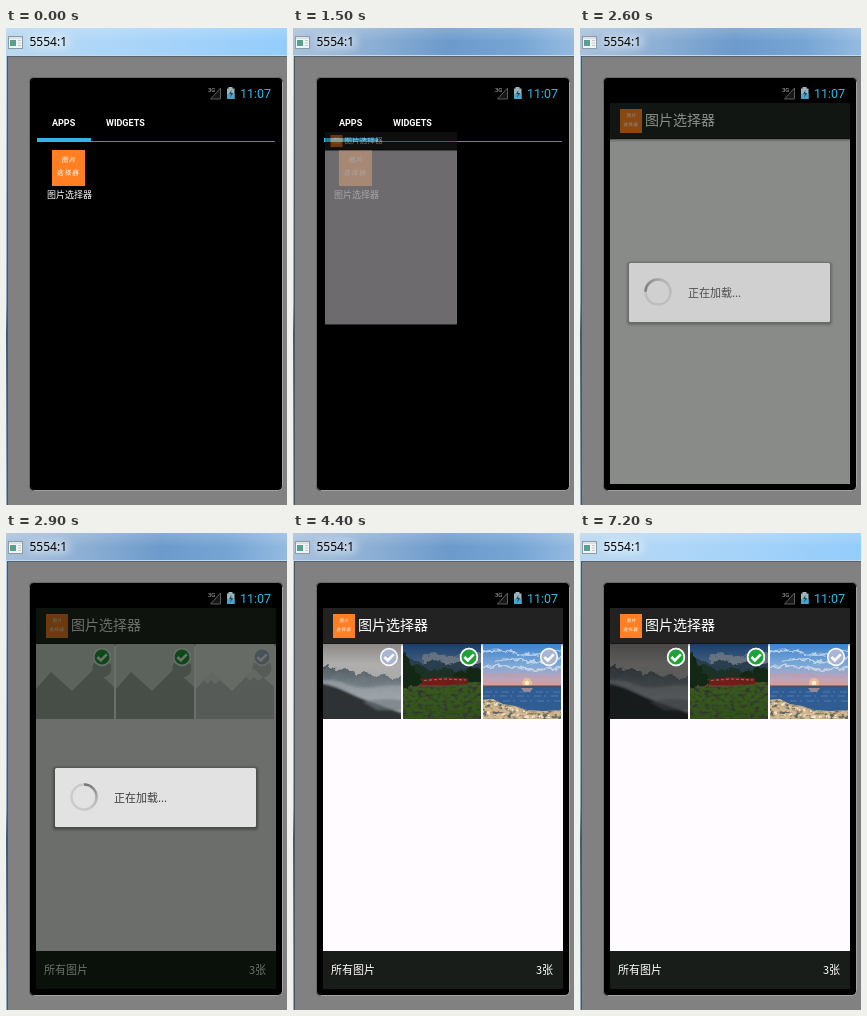
An HTML page that plays this animation: 281 by 477 pixels, repeating every 7.3 s.

```html
<!DOCTYPE html>
<html lang="zh-CN">
<head>
<meta charset="utf-8">
<title>图片选择器</title>
<style>
html, body { margin: 0; width: 100%; height: 100%; overflow: hidden; background: #818181; }
svg { display: block; width: 281px; height: 477px; }
text { font-family: "Noto Sans CJK SC", "Noto Sans CJK", "Noto Sans", sans-serif; font-weight: 500; fill: #fff; }
.latin { font-family: Roboto, sans-serif; font-weight: 400; }
.tab { font-weight: 700; }

/* One 7.3 s loop, hard steps on a 100 ms grid */
.focus, .launcher, .app, .grid, .photos, .dim, .dialog, .on1, .on2 {
  animation: 7.3s step-end infinite;
}
.focus { animation-name: focus; }
.launcher { animation-name: recede; }
.app { animation-name: open; }
.grid { animation-name: grid; }
.photos { animation-name: photos; }
.dim, .dialog { animation-name: loading; }
.on1 { animation-name: toggle1; }
.on2 { animation-name: toggle2; }
.spin { animation: spin 7.3s steps(73) infinite; }

@keyframes focus {
  0% { opacity: 0; } 12.32% { opacity: .6; } 13.69% { opacity: 1; } 98.63%, 100% { opacity: 0; }
}
@keyframes recede { 0% { opacity: 1; } 20.54% { opacity: .4; } 21.91%, 100% { opacity: 0; } }
@keyframes open {
  0% { opacity: 0; transform: translate(32px, 104px) scale(.55, .504); }
  20.54% { opacity: .43; transform: translate(32px, 104px) scale(.55, .504); }
  21.91% { opacity: .8; transform: translate(30.6px, 84px) scale(.85, .83); }
  23.28%, 100% { opacity: 1; transform: translate(30px, 75px); }
}
@keyframes grid { 0% { opacity: 0; } 39.72%, 100% { opacity: 1; } }
@keyframes photos { 0% { opacity: 0; } 42.46%, 100% { opacity: 1; } }
@keyframes loading {
  0% { opacity: 0; } 34.24% { opacity: .4; } 35.61% { opacity: .8; } 36.98% { opacity: 1; }
  41.09% { opacity: .6; } 42.46% { opacity: .25; } 43.83%, 100% { opacity: 0; }
}
@keyframes toggle1 { 0% { opacity: 1; } 60.27% { opacity: 0; } 79.45%, 100% { opacity: 1; } }
@keyframes toggle2 { 0% { opacity: 1; } 71.23% { opacity: 0; } 91.78%, 100% { opacity: 1; } }
@keyframes spin { from { transform: rotate(-138deg); } to { transform: rotate(2022deg); } }
</style>
</head>
<body>
<svg viewBox="0 0 281 477" xmlns="http://www.w3.org/2000/svg">
<defs>
  <linearGradient id="barLight">
    <stop offset="0" stop-color="#b9d7f0"/><stop offset=".35" stop-color="#aed6f8"/><stop offset="1" stop-color="#93ccfb"/>
  </linearGradient>
  <linearGradient id="barDark">
    <stop offset="0" stop-color="#a9c1dc"/><stop offset=".3" stop-color="#8aadd3"/>
    <stop offset=".55" stop-color="#6c9acb"/><stop offset=".8" stop-color="#76a5d4"/><stop offset="1" stop-color="#94bae0"/>
  </linearGradient>
  <linearGradient id="gloss" x2="0" y2="1">
    <stop offset="0" stop-color="#fff" stop-opacity=".18"/><stop offset="1" stop-color="#fff" stop-opacity="0"/>
  </linearGradient>
  <linearGradient id="edge" x2="0" y2="1">
    <stop offset="0" stop-color="#a9c9e5"/><stop offset=".55" stop-color="#86a8c6"/>
    <stop offset=".62" stop-color="#3d5676"/><stop offset=".75" stop-color="#5e7d9d"/><stop offset="1" stop-color="#8fabc4"/>
  </linearGradient>
  <linearGradient id="drop" x2="0" y2="1">
    <stop offset="0" stop-opacity=".35"/><stop offset="1" stop-opacity="0"/>
  </linearGradient>
  <linearGradient id="mist" x2="0" y2="1">
    <stop offset="0" stop-color="#8b8886"/><stop offset=".27" stop-color="#b0aeac"/><stop offset="1" stop-color="#999fa3"/>
  </linearGradient>
  <linearGradient id="ridge" x2="0" y2="1">
    <stop offset="0" stop-color="#4e5a61"/><stop offset="1" stop-color="#9da5aa"/>
  </linearGradient>
  <linearGradient id="sky" x2="0" y2="1">
    <stop offset="0" stop-color="#2f76cf"/><stop offset=".35" stop-color="#9cc5ed"/>
  </linearGradient>
  <linearGradient id="meadow" x2="0" y2="1">
    <stop offset="0" stop-color="#6cae35"/><stop offset="1" stop-color="#5b9a2c"/>
  </linearGradient>
  <linearGradient id="dusk" x2="0" y2="1">
    <stop offset="0" stop-color="#3b82cc"/><stop offset=".5" stop-color="#7fa9d6"/>
    <stop offset=".8" stop-color="#b9a5bd"/><stop offset="1" stop-color="#e59a86"/>
  </linearGradient>
  <linearGradient id="arc" x2="0" y2="1">
    <stop offset="0" stop-color="#777"/><stop offset="1" stop-color="#bbb" stop-opacity=".2"/>
  </linearGradient>
  <filter id="soft" x="-20%" y="-40%" width="140%" height="180%"><feGaussianBlur stdDeviation="1"/></filter>
  <filter id="glow" x="-30%" y="-60%" width="160%" height="220%"><feGaussianBlur stdDeviation="4"/></filter>
  <!-- Ragged outlines, and dark speckles inside a shape -->
  <filter id="rough">
    <feTurbulence type="fractalNoise" baseFrequency=".16" numOctaves="3" seed="4"/>
    <feDisplacementMap in="SourceGraphic" scale="7" xChannelSelector="R" yChannelSelector="G"/>
  </filter>
  <filter id="grain">
    <feTurbulence type="fractalNoise" baseFrequency=".2 .28" numOctaves="3" seed="7"/>
    <feColorMatrix values="0 0 0 0 .12  0 0 0 0 .13  0 0 0 0 .1  4 0 0 0 -1.8"/>
    <feComposite in2="SourceGraphic" operator="in" result="spots"/>
    <feMerge><feMergeNode in="SourceGraphic"/><feMergeNode in="spots"/></feMerge>
  </filter>
  <clipPath id="tile"><rect width="78" height="75"/></clipPath>

  <g id="icon">
    <rect width="33" height="36" fill="#ff7f22"/>
    <g font-size="6.6" letter-spacing="1" transform="skewX(-6)">
      <text x="11" y="12.5">图片</text><text x="7.5" y="25.5">选择器</text>
    </g>
  </g>
  <g id="tick">
    <circle cx="66" cy="13" r="8.3" stroke="#f4f6fa" stroke-width="1.7"/>
    <path d="M61.4 13l3.4 3.5 6-6.2" fill="none" stroke="#fff" stroke-width="2.6"/>
  </g>
  <g id="blank" clip-path="url(#tile)">
    <circle cx="66" cy="24" r="9.5"/>
    <path d="M0 45L15 28 36 47 58 25 78 43V75H0z"/>
  </g>

  <g id="fog" clip-path="url(#tile)">
    <rect width="78" height="75" fill="url(#mist)"/>
    <path d="M-5 24L6 21 14 26 24 25 33 31 42 28 52 33 62 30 70 35 83 33V62H-5z" fill="url(#ridge)" filter="url(#rough)"/>
    <g filter="url(#soft)">
      <path d="M-5 37Q10 34 24 40T52 43 83 42V58H-5z" fill="#a9b0b4" opacity=".55"/>
      <path d="M-5 39Q10 41 22 47T48 58 83 71V80H-5z" fill="#2d3235"/>
      <path d="M40 58Q60 52 83 57V66H54z" fill="#717a80" opacity=".6"/>
    </g>
  </g>
  <g id="valley" clip-path="url(#tile)">
    <rect width="78" height="75" fill="url(#sky)"/>
    <g filter="url(#rough)">
      <path d="M20 13Q30 6 40 11T60 9 82 14V22H20z" fill="#e6eff8" opacity=".7"/>
      <path d="M-5 16L8 13 20 20 32 15 44 21 56 17 66 22 83 17V42H-5z" fill="#4f7590"/>
      <path d="M-5 24L14 21 28 27 44 24 60 28 83 24V42H-5z" fill="#335c45"/>
    </g>
    <path d="M-5 38Q20 33 42 37T83 36V80H-5z" fill="url(#meadow)" filter="url(#grain)"/>
    <g fill="#234a26" filter="url(#rough)">
      <path d="M-5 12l7-4 5 11 5 6 6 9 4 6-10 3H-5z"/>
      <path d="M50 33l6-7 6 4 6-7 15 3v12H50z"/>
    </g>
    <path d="M19 35l22-2 24 1v6l-22 1-24 0z" fill="#d5342a"/>
    <path d="M21 36.5l20-1.5 22 1" fill="none" stroke="#f3d8cb" stroke-width="1.2" stroke-dasharray="3 2"/>
    <path d="M5 43l40-1 33 0" fill="none" stroke="#8c8d68"/>
  </g>
  <g id="shore" clip-path="url(#tile)">
    <rect width="78" height="43" fill="url(#dusk)"/>
    <g fill="none" stroke="#dfe6f1" stroke-width="2.2" opacity=".7" filter="url(#rough)">
      <path d="M-4 9q20-5 35 0t50-3M12 17q18-4 30 0t40-4M-4 24q20-4 42 0t44-2"/>
      <path d="M-4 32q20-2 42 0t44-1" stroke="#c59aa8"/>
    </g>
    <circle cx="44" cy="39" r="5" fill="#ffc78e" opacity=".65"/>
    <circle cx="44" cy="39" r="2.2" fill="#fff5c8"/>
    <path d="M0 42h78v27H0z" fill="#2f5c93"/>
    <path d="M0 41.5h78v2H0z" fill="#40506f"/>
    <path d="M38 44h12l-3 4h-6z" fill="#e4a894" opacity=".6"/>
    <path d="M2 48h75M0 52h78M20 57h58" stroke="#5b86b6" stroke-width=".8" stroke-dasharray="7 3 2 5"/>
    <g filter="url(#grain)">
      <path d="M-4 56l14-1 10 5 12 2 12 4 16 1 22-1v14H-4z" fill="#d3b78e"/>
      <path d="M-4 59l16 1 16 5 16 3M-4 68l30 3 20 2 36-1" fill="none" stroke="#f2e3c8" stroke-width="3" stroke-dasharray="5 3 3 4"/>
    </g>
  </g>
</defs>

<!-- Emulator window -->
<rect width="281" height="477" fill="#818181"/>
<rect width="281" height="28" fill="url(#barLight)"/>
<rect class="focus" width="281" height="28" fill="url(#barDark)"/>
<rect width="281" height="14" fill="url(#gloss)"/>
<rect x="22" y="8" width="42" height="12" rx="6" fill="#fff" opacity=".45" filter="url(#glow)"/>
<rect y="27" width="281" height="1" fill="#c3d9ec"/>
<rect x="1" y="28" width="280" height="1" fill="#55616c"/>
<rect y="28" width="1" height="449" fill="url(#edge)"/>
<rect x="1" y="28" width="1" height="449" fill="#4c5660"/>
<g transform="translate(2 8)">
  <rect x=".5" y=".5" width="14" height="12" fill="#f1f4f4" stroke="#8f9ba2"/>
  <path d="M1 2h13" stroke="#c5cfd4"/>
  <rect x="2" y="4" width="6" height="6" fill="#5aa08f"/>
  <path d="M10 4.5h3M10 7h3M10 9.5h3" stroke="#c0c9ce"/>
</g>
<text x="23.5" y="18" font-size="12" style="font-family:'Noto Sans',sans-serif;font-weight:400;fill:#000">5554:1</text>

<!-- Device -->
<rect x="23.5" y="49.5" width="253" height="413" rx="4" stroke="#6b6b6b"/>
<path d="M276.5 54V458.5q0 4-4 4H28" fill="none" stroke="#a2a2a2"/>
<text class="latin" x="202" y="64" font-size="6" style="fill:#b8b8b8">3G</text>
<path d="M214.5 60v11h-10z" fill="#171717" stroke="#5b5b5b"/>
<path d="M222.5 59h4v1.5h2V71h-7.5V60.5h1.5z" fill="#9db4bd"/>
<path d="M221 66h7.5v5H221z" fill="#46a5cb"/>
<path d="M225.5 62l-2.5 4h2l-.8 3.5 3-4.5h-2z" fill="#17495b"/>
<text class="latin" x="234" y="70" font-size="12.5" style="fill:#33b5e5">11:07</text>

<!-- App drawer -->
<g font-size="9">
  <text class="latin tab" x="46" y="98">APPS</text><text class="latin tab" x="100" y="98">WIDGETS</text>
</g>
<rect x="31" y="113" width="238" height="1" fill="#548d9f"/>
<rect x="31" y="110" width="54" height="4" fill="#33b5e5"/>
<g class="launcher">
  <use href="#icon" x="46" y="122"/>
  <text x="41" y="170" font-size="9">图片选择器</text>
</g>

<!-- Picker -->
<g class="app">
  <rect width="240" height="381" fill="#fffbff"/>
  <rect y="36" width="240" height="3" fill="url(#drop)"/>
  <rect width="240" height="36" fill="#222"/>
  <rect y="35" width="240" height="1" fill="#161616"/>
  <use href="#icon" transform="translate(10 6) scale(.667)"/>
  <text x="35" y="22" font-size="14">图片选择器</text>

  <g class="grid">
    <g transform="translate(0 36)">
      <rect width="78" height="75" fill="#dcdedc"/><use href="#blank" fill="#a9aca9"/>
      <g class="photos"><use href="#fog"/><rect class="on1" width="78" height="75" fill="rgba(0,0,0,.47)"/></g>
      <use href="#tick" fill="#a9b5d3"/><use class="on1" href="#tick" fill="#1fa337"/>
    </g>
    <g transform="translate(80 36)">
      <rect width="78" height="75" fill="#dcdedc"/><use href="#blank" fill="#a9aca9"/>
      <g class="photos"><use href="#valley"/><rect class="on2" width="78" height="75" fill="rgba(0,0,0,.47)"/></g>
      <use href="#tick" fill="#a9b5d3"/><use class="on2" href="#tick" fill="#1fa337"/>
    </g>
    <g transform="translate(160 36)">
      <rect width="78" height="75" fill="#f5f3f5"/><use href="#blank" fill="#d0ced0"/>
      <path d="M8 36l7-8 9 8-5 4-4-4-4 4zM50 33l8-8 9 8-5 4-4-4-4 4z" fill="#f0eef0"/>
      <use class="photos" href="#shore"/>
      <use href="#tick" fill="#a9b5d3"/>
    </g>
    <rect y="343" width="240" height="38" fill="#191d19"/>
    <g font-size="11">
      <text x="8" y="366">所有图片</text><text x="230" y="366" text-anchor="end">3张</text>
    </g>
  </g>

  <rect class="dim" width="240" height="381" fill="rgba(0,9,0,.58)"/>
  <g class="dialog">
    <rect x="17" y="159" width="205" height="63" rx="3" fill="#000" opacity=".3" filter="url(#soft)"/>
    <rect x="19" y="160" width="201" height="59" rx="1.5" fill="#e2e2e2"/>
    <g transform="translate(48 189)" fill="none" stroke-width="2.6">
      <circle r="12.5" stroke="#cbcbcb"/>
      <g class="spin"><path d="M0-12.5A12.5 12.5 0 0 1 0 12.5" stroke="url(#arc)"/></g>
    </g>
    <text x="78" y="194" font-size="11" style="fill:#3d3d3d">正在加载...</text>
  </g>
</g>
</svg>
</body>
</html>
```
